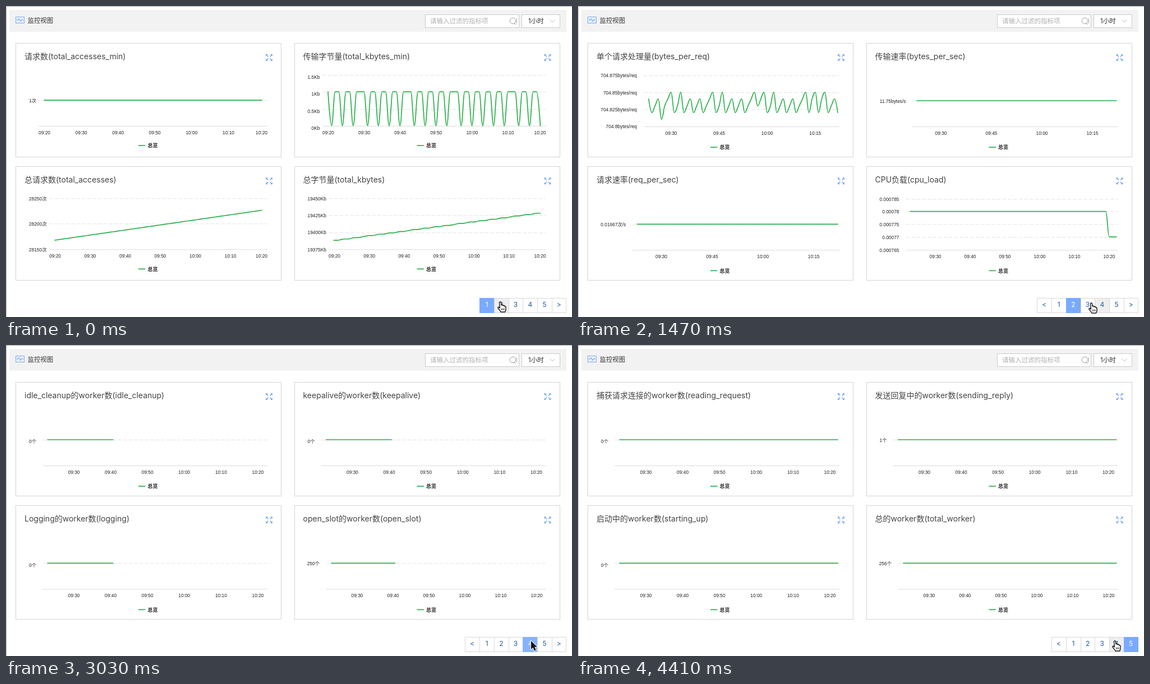
Write an HTML page with a canvas that moves like this. It is 1009 px wide and 555 px high and loops after 4.53 s.

```html
<!DOCTYPE html>
<html lang="zh-CN">
<head>
<meta charset="utf-8">
<style>
html, body { margin: 0; width: 100%; height: 100%; overflow: hidden; background: #fff; }
canvas { display: block; width: 1009px; height: 555px; }
</style>
</head>
<body>
<canvas id="stage"></canvas>
<script>
const W = 1009, H = 555, LOOP = 4530, STEP = 30;
const GREEN = '#2bb04b', BLUE = '#7aaaff', INK = '#222';
const TITLE = 'Inter, "Noto Sans CJK SC", "Noto Sans CJK", sans-serif';
const LABEL = '"Liberation Sans", "Noto Sans CJK SC", "Noto Sans CJK", sans-serif';

const canvas = document.getElementById('stage');
const ctx = canvas.getContext('2d');
const dpr = window.devicePixelRatio || 1;
canvas.width = W * dpr;
canvas.height = H * dpr;

// Chart values: one per minute, as a fraction of the plot height
const series = f => Array.from({ length: 60 }, (_, i) => f(i));
const dips = new Set([1]);
[...'334333433343333433'].reduce((at, gap) => {
  dips.add(at + +gap);
  return at + +gap;
}, 1);
const perRequest = '423413452352342342345235234234234534523523423423452452452342';
let sent = 13;

const flat = series(() => 0.5);
const traffic = series(i => dips.has(i) ? 0 : 2 / 3);
const accesses = series(i => 0.176 + 0.588 * i / 59);
const kbytes = series(i => (i && !dips.has(i) ? ++sent : sent) / 75);
const bytes = series(i => perRequest[i] / 7.5);
const cpu = series(i => i < 57 ? 0.75 : 0.25);

// Horizontal positions are those of the left column
const worker = (title, value, extra) => ({
  title, marks: [value + '个'], right: 54, left: 65, from: 74, to: 463,
  tick: 121, gap: 65.6, start: 570, every: 10, data: flat,
  drop: value === 0 ? 2.5 : 0, ...extra
});
const wide = { right: 62.5, left: 74.5, from: 83.5, tick: 129.5, gap: 64 };
const hour = { start: 560, every: 10, to: 456 };

const pages = [
  { begin: 0, anim: -2000, charts: [
    { title: '请求数(total_accesses_min)', marks: ['1次'], right: 54, left: 58, from: 68,
      tick: 68.5, gap: 65.6, data: flat, ...hour },
    { title: '传输字节量(total_kbytes_min)', marks: ['1.5Kb', '1Kb', '0.5Kb', '0Kb'], right: 63, left: 68,
      from: 77.5, tick: 78, gap: 64.1, data: traffic, drop: 3.5, ...hour },
    { title: '总请求数(total_accesses)', marks: ['28250次', '28200次', '28150次'], right: 72.5, left: 77,
      from: 87, tick: 87.5, gap: 62.5, data: accesses, ...hour },
    { title: '总字节量(total_kbytes)', marks: ['19450Kb', '19425Kb', '19400Kb', '19375Kb'], right: 74.5, left: 79,
      from: 88, tick: 89, gap: 62.2, data: kbytes, ...hour }
  ] },
  { begin: 360, anim: 368, charts: [
    { title: '单个请求处理量(bytes_per_req)',
      marks: ['704.875bytes/req', '704.85bytes/req', '704.825bytes/req', '704.8bytes/req'],
      right: 105, left: 117, from: 126, to: 463, tick: 166, gap: 85.6, start: 570, every: 15, data: bytes },
    { title: '传输速率(bytes_per_sec)', marks: ['11.75bytes/s'], right: 88, left: 99.5, from: 107.5, to: 463,
      tick: 150.5, gap: 90, start: 570, every: 15, data: flat },
    { title: '请求速率(req_per_sec)', marks: ['0.01667次/s'], right: 85.5, left: 97, from: 105.5, to: 463,
      tick: 148.5, gap: 90.6, start: 570, every: 15, data: flat, lag: -15 },
    { title: 'CPU负载(cpu_load)', marks: ['0.000785', '0.00078', '0.000775', '0.00077', '0.000765'],
      right: 76, left: 87.5, from: 95.5, to: 463, tick: 140.5, gap: 62, start: 570, every: 10, data: cpu }
  ] },
  { begin: 1800, anim: 1796, charts: [
    worker('Closing的worker数(closing)', 0),
    worker('waiting的workder数(waiting)', 5),
    worker('DNS_lookup的worker数(dns_lookup)', 0),
    worker('finishing状态的worker数(gracefully_finishing)', 0, { lag: 33 })
  ] },
  { begin: 2760, anim: 2757, charts: [
    worker('idle_cleanup的worker数(idle_cleanup)', 0),
    worker('keepalive的worker数(keepalive)', 0),
    worker('Logging的worker数(logging)', 0),
    worker('open_slot的worker数(open_slot)', 250, wide)
  ] },
  { begin: 3690, anim: 3710, charts: [
    worker('捕获请求连接的worker数(reading_request)', 0),
    worker('发送回复中的worker数(sending_reply)', 1),
    worker('启动中的worker数(starting_up)', 0),
    worker('总的worker数(total_worker)', 256, wide)
  ] }
];

// Pointer path: time, x, y
const route = [
  [0, 881, 528], [360, 881, 528], [390, 880, 527], [1040, 880, 527], [1260, 924, 530],
  [1440, 924, 530], [1470, 915, 530], [1620, 900, 527], [1800, 898, 525], [2460, 898, 525],
  [2610, 936, 528], [3330, 936, 528], [3510, 957, 528], [LOOP, 957, 528]
];

const hand = new Path2D('M-1.5 1.5Q-1.5 0 0 0Q1.5 0 1.6 1.5L2 6Q2.4 5 3.7 5.3Q4.9 5.6 5 7' +
  'Q5.7 6 6.9 6.5Q8 7 8.1 8.2Q9.6 7.6 10 9L10 13Q10 15.5 8.6 18L1 18Q-.5 15-3 12.5Q-5 10-3.5 9.3Q-2.5 8.8-.6 11Z');
const knuckles = new Path2D('M2.6 11.5V15M4.8 11.5V15M7 11.5V15');
const arrow = new Path2D('M0 0V15L3.4 11.9L6 17.6L8.8 16.4L6.3 10.8H10.8Z');

const clamp = v => Math.max(0, Math.min(1, v));
const swing = v => 0.5 - Math.cos(Math.PI * clamp(v)) / 2;
const snap = v => Math.floor(v) + 0.5;

function text(str, x, y, size, color, align = 'left', family = LABEL, weight = 400) {
  ctx.font = `${weight} ${size}px ${family}`;
  ctx.fillStyle = color;
  ctx.textAlign = align;
  ctx.fillText(str, x, y + size * 0.36);
}

function line(points, color, width = 1, dash = []) {
  ctx.beginPath();
  points.forEach(([x, y]) => ctx.lineTo(x, y));
  ctx.strokeStyle = color;
  ctx.lineWidth = width;
  ctx.setLineDash(dash);
  ctx.stroke();
  ctx.setLineDash([]);
}

function box(x, y, w, h, fill, stroke) {
  ctx.fillStyle = fill;
  ctx.fillRect(x, y, w, h);
  if (!stroke) return;
  ctx.strokeStyle = stroke;
  ctx.lineWidth = 1;
  ctx.strokeRect(snap(x), snap(y), Math.round(w) - 1, Math.round(h) - 1);
}

function header() {
  box(0, 0, W, 1, '#a5a5a5');
  box(0, 0, 1, H, '#b5b5b5');
  box(6, 7, 993, 39, '#f2f2f2');
  box(17, 19, 16, 12, '#e8f1ff', '#7fabea');
  line([[19, 25], [21.5, 25], [23, 22.5], [26, 27.5], [28, 24], [29, 25], [31, 25]], '#5f97e8');
  text('监控视图', 38.5, 25.5, 11.4, '#333', 'left', TITLE);

  box(747, 15, 168, 24, '#fff', '#ccc');
  text('请输入过滤的指标项', 756, 27, 11.5, '#b0b0b0', 'left', TITLE);
  ctx.beginPath();
  ctx.arc(903.5, 26.5, 5.3, 0, 7);
  ctx.strokeStyle = '#999';
  ctx.stroke();
  line([[905.5, 30.5], [909, 33]], '#999');
  line([[910.5, 22], [910.5, 31]], '#aaa');

  box(919, 15, 69, 24, '#fff', '#ccc');
  text('1小时', 931, 26.7, 11.5, '#333', 'left', TITLE);
  line([[969.5, 24.5], [974, 29], [978.5, 24.5]], '#bbb');
}

function expandIcon(x, y) {
  for (const sx of [-1, 1]) for (const sy of [-1, 1]) {
    const at = (a, b) => [x + sx * a, y + sy * b];
    line([at(1.6, 1.6), at(5, 5)], '#79a9f5', 1.5);
    ctx.fillStyle = '#79a9f5';
    ctx.beginPath();
    [at(6, 6), at(2.2, 6), at(6, 2.2)].forEach(p => ctx.lineTo(...p));
    ctx.fill();
  }
}

// Smooth curve with flat tangents at the extremes
function spline(pts) {
  ctx.beginPath();
  ctx.moveTo(...pts[0]);
  let [cx, cy] = pts[0];
  for (let i = 1; i < pts.length; i++) {
    const [px, py] = pts[i - 1], [x, y] = pts[i];
    let lx = x, ly = y, rx = x, ry = y;
    if (i < pts.length - 1) {
      const [nx, ny] = pts[i + 1];
      const mix = (a, b) => (1.5 * a + b) / 2.5;
      lx = mix(x, px); ly = mix(y, py);
      rx = mix(x, nx); ry = mix(y, ny);
      const shift = (ry - ly) * (rx - x) / (rx - lx) + y - ry;
      ly += shift;
      ry += shift;
      const l = Math.max(Math.min(y, py), Math.min(Math.max(y, py), ly));
      if (l !== ly) { ly = l; ry = 2 * y - l; }
      const r = Math.max(Math.min(y, ny), Math.min(Math.max(y, ny), ry));
      if (r !== ry) { ry = r; ly = 2 * y - r; }
    }
    ctx.bezierCurveTo(cx, cy, lx, ly, x, y);
    cx = rx;
    cy = ry;
  }
  ctx.strokeStyle = GREEN;
  ctx.lineWidth = 1.7;
  ctx.lineJoin = ctx.lineCap = 'round';
  ctx.stroke();
  ctx.lineCap = 'butt';
}

const clock = m => [m / 60 | 0, m % 60].map(n => String(n).padStart(2, '0')).join(':');

function chart(c, first, shown) {
  const top = first ? 123.5 : 124.2, bottom = first ? 214.3 : 215.2;
  const rowY = v => bottom - v * (bottom - top);
  const { marks, left } = c;

  text(c.title, 33, 90, 14, '#444', 'left', TITLE);
  expandIcon(469, 92);

  marks.forEach((mark, i) => {
    const v = marks.length > 1 ? 1 - i / (marks.length - 1) : 0.5;
    const y = rowY(v);
    if (v) line([[left, snap(y)], [466, snap(y)]], '#e4e4e4', 1, [7, 2.6]);
    text(mark, c.right, y + (c.drop || 0), 8.4, INK, 'right');
  });
  line([[left, snap(bottom)], [466, snap(bottom)]], '#dcdcdc');

  for (let x = c.tick, m = c.start; x < 464; x += c.gap, m += c.every) {
    text(clock(m), Math.min(x, first ? 455.5 : x), first ? 225.5 : 226.7, 8.4, INK, 'center');
  }

  const legendY = first ? 249 : 252;
  line([[236, legendY], [248.5, legendY]], GREEN, 1.7);
  text('总览', 252.5, legendY, 9, INK, 'left', LABEL, 700);

  if (shown <= 0) return;
  ctx.save();
  ctx.beginPath();
  ctx.rect(left, 100, (466 - left) * shown, 130);
  ctx.clip();
  spline(c.data.map((v, i) => [c.from + (c.to - c.from) * i / 59, rowY(v) - 0.7]));
  ctx.restore();
}

function pointer(t) {
  const i = route.findIndex(p => p[0] > t);
  const [t0, x0, y0] = route[i - 1], [t1, x1, y1] = route[i];
  const k = swing((t - t0) / (t1 - t0));
  return [x0 + (x1 - x0) * k, y0 + (y1 - y0) * k];
}

// Draws the page buttons and tells whether the pointer rests on the active one
function pager(page, t) {
  const names = ['1', '2', '3', '4', '5'];
  if (page > 0) names.unshift('<');
  if (page < 4) names.push('>');
  const width = 25.75;
  const start = 998.7 - names.length * width;
  const hover = Math.floor((pointer(Math.max(0, t - STEP))[0] - start) / width);
  const active = names.indexOf(String(page + 1));
  const edge = i => Math.round(start + i * width);

  names.forEach((_, i) => {
    const last = i === names.length - 1 ? 0 : 1;
    box(edge(i), 521, edge(i + 1) - edge(i) + last, 27, i === hover ? '#eee' : '#fff', '#d8d8d8');
  });
  box(edge(active), 521, edge(active + 1) - edge(active), 27, active === hover ? '#86b3ff' : BLUE);
  names.forEach((name, i) => {
    text(name, start + (i + 0.5) * width, 532.7, 12, i === active ? '#fff' : '#1f5c9c', 'center', TITLE);
  });
  return hover === active;
}

function cursor(t, plain) {
  ctx.save();
  ctx.translate(...pointer(t));
  ctx.lineJoin = 'round';
  if (plain) {
    ctx.strokeStyle = '#fff';
    ctx.lineWidth = 2;
    ctx.stroke(arrow);
    ctx.fillStyle = '#111';
    ctx.fill(arrow);
  } else {
    ctx.fillStyle = '#fff';
    ctx.fill(hand);
    ctx.strokeStyle = '#111';
    ctx.lineWidth = 1.4;
    ctx.stroke(hand);
    ctx.lineWidth = 0.9;
    ctx.stroke(knuckles);
  }
  ctx.restore();
}

function draw(t) {
  const page = pages.filter(p => p.begin <= t).length - 1;
  const { anim, charts } = pages[page];
  ctx.setTransform(dpr, 0, 0, dpr, 0, 0);
  box(0, 0, W, H, '#fff');
  header();
  charts.forEach((c, i) => {
    const col = i % 2, row = i >> 1;
    box(17 + col * 497, 66 + row * 220, 474, 204, '#fff', '#d4d4d4');
    ctx.save();
    ctx.translate(col * 496.5, row * 220.3);
    chart(c, page === 0, swing((t - anim - (c.lag || 0)) / 720));
    ctx.restore();
  });
  cursor(t, pager(page, t));
}

const origin = performance.now();
function tick() {
  const t = (performance.now() - origin) % LOOP;
  draw(Math.floor(t / STEP) * STEP);
  requestAnimationFrame(tick);
}
tick();
</script>
</body>
</html>
```
